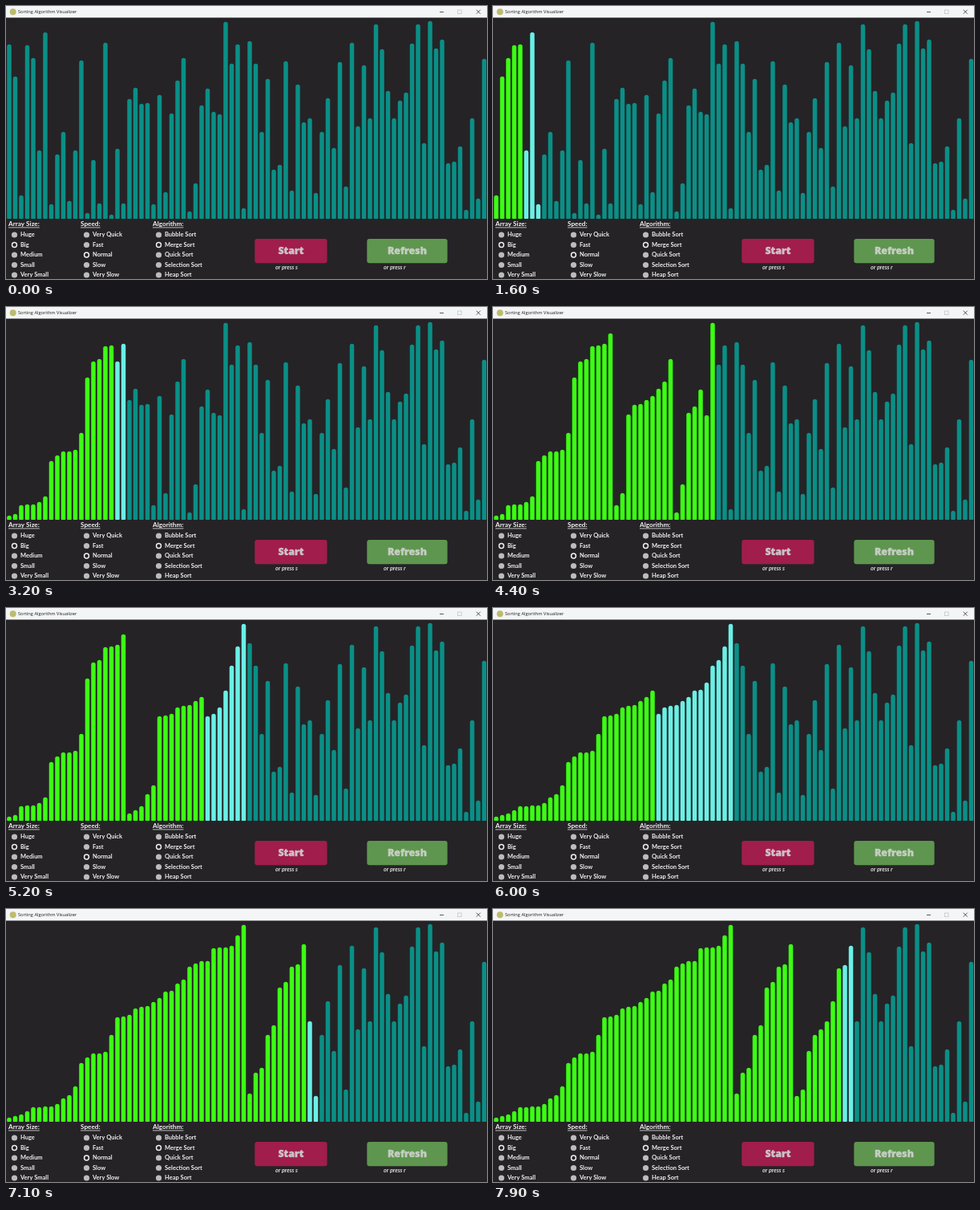
Recreate the animation shown at these times as an HTML page with a canvas. Size 600 px wide and 340 px high, loop 8 s.

```html
<!DOCTYPE html>
<html lang="en">
<head>
<meta charset="utf-8">
<title>Sorting Algorithm Visualizer</title>
<style>
  html, body { margin: 0; width: 100%; height: 100%; overflow: hidden; background: #252326; }
  canvas { display: block; width: 600px; height: 340px; }
</style>
</head>
<body>
<canvas id="stage"></canvas>
<script>
const W = 600, H = 340, LOOP = 8000, TICK = 100, BASE = 265;
const BG = '#252326', TEAL = '#0a8f86', GREEN = '#3cff14', CYAN = '#6af0e6';
const canvas = document.getElementById('stage');
const ctx = canvas.getContext('2d');
const dpr = window.devicePixelRatio || 1;
canvas.width = W * dpr;
canvas.height = H * dpr;
ctx.scale(dpr, dpr);

// Top edge of each bar before sorting
const tops = [
  48, 88, 236, 49, 65, 180, 33, 247, 185, 157, 243, 180, 68, 258, 192, 246, 46, 260, 178, 246,
  116, 102, 122, 121, 247, 111, 232, 134, 93, 65, 256, 221, 124, 103, 132, 135, 20, 72, 48, 252,
  44, 72, 157, 91, 204, 198, 69, 230, 98, 145, 140, 233, 157, 115, 177, 70, 225, 46, 150, 74,
  140, 23, 54, 106, 140, 118, 108, 47, 23, 171, 19, 53, 42, 196, 194, 175, 254, 140, 240, 66
];

// Every visible state of the merge sort; "at" is its place on the work axis
const states = [];
const START_COST = 0.25;

function record() {
  const bars = tops.slice(), tint = bars.map(() => TEAL);
  let work = 0;
  const push = cost => {
    states.push({ bars: bars.slice(), tint: tint.slice(), at: work });
    work += cost;
  };
  function sort(lo, hi) {
    if (lo >= hi) return;
    const mid = (lo + hi) >> 1;
    sort(lo, mid);
    sort(mid + 1, hi);
    const left = bars.slice(lo, mid + 1), right = bars.slice(mid + 1, hi + 1);
    tint.fill(CYAN, lo, hi + 1);
    push(START_COST);
    for (let k = lo; k <= hi; k++) {
      const takeLeft = !right.length || (left.length && left[0] >= right[0]);
      bars[k] = (takeLeft ? left : right).shift();
      tint[k] = GREEN;
      push(1);
    }
  }
  push(1);
  sort(0, bars.length - 1);
}
record();

// Pace of the sort: [tick, state reached]
const pace = [[0, 0], [12, 0], [16, 20], [32, 105], [44, 169], [60, 242], [71, 299], [79, 339]];

function stateAt(tick) {
  let i = 0;
  while (i < pace.length - 2 && tick >= pace[i + 1][0]) i++;
  const [t0, s0] = pace[i], [t1, s1] = pace[i + 1];
  const a = states[s0].at, b = states[s1].at;
  const work = a + (b - a) * (tick - t0) / (t1 - t0) + 1e-6;
  let n = s0;
  while (n < s1 && states[n + 1].at <= work) n++;
  return states[n];
}

function box(x, y, w, h, r, color) {
  ctx.fillStyle = color;
  ctx.beginPath();
  ctx.roundRect(x, y, w, h, r);
  ctx.fill();
}

function disc(x, y, r, color) {
  ctx.fillStyle = color;
  ctx.beginPath();
  ctx.arc(x, y, r, 0, Math.PI * 2);
  ctx.fill();
}

function line(color, width, ...pts) {
  ctx.strokeStyle = color;
  ctx.lineWidth = width;
  ctx.beginPath();
  for (let i = 0; i < pts.length; i += 4) {
    ctx.moveTo(pts[i], pts[i + 1]);
    ctx.lineTo(pts[i + 2], pts[i + 3]);
  }
  ctx.stroke();
}

function label(str, x, y, font, color, align = 'left') {
  ctx.font = font;
  ctx.fillStyle = color;
  ctx.textAlign = align;
  ctx.fillText(str, x, y);
}

function titleBar() {
  box(0, 0, W, 14.5, 0, '#f3f5f6');
  disc(8.7, 7.2, 4, '#bdbb6c');
  label('Sorting Algorithm Visualizer', 15, 9.4, '5.7px "Open Sans", sans-serif', '#1c1c1c');
  line('#333', 0.8, 541, 7.5, 546, 7.5);
  ctx.strokeStyle = '#c4c6c7';
  ctx.strokeRect(563.5, 5, 4.6, 4.6);
  line('#333', 0.8, 586.8, 4.7, 591.8, 9.7, 591.8, 4.7, 586.8, 9.7);
}

function group(x, title, items, chosen) {
  label(title, x, 274.3, 'bold 8.2px Lato, sans-serif', '#f2f2f2');
  line('#e4e4e4', 0.8, x, 275.9, x + ctx.measureText(title).width, 275.9);
  items.forEach((item, i) => {
    const y = 285 + 12.5 * i;
    if (i === chosen) {
      disc(x + 7.5, y, 3.7, '#f0f0f0');
      disc(x + 7.5, y, 2.2, BG);
    } else {
      disc(x + 7.5, y, 3.6, '#bcbcbc');
    }
    label(item, x + 15, y + 2.3, 'bold 7.5px Lato, sans-serif', '#f0f0f0');
  });
}

function button(x, w, str, room, hint, color, ink) {
  box(x, 290, w, 30.3, 3, color);
  const face = size => `800 condensed ${size}px "Open Sans", "Liberation Sans Narrow", sans-serif`;
  ctx.font = face(17);
  const size = Math.min(17, 17 * room / ctx.measureText(str).width);
  const mid = x + w / 2;
  label(str, mid, 305 + size * 0.36, face(size), ink, 'center');
  ctx.strokeStyle = ink;
  ctx.lineWidth = 0.4;
  ctx.strokeText(str, mid, 305 + size * 0.36);
  label(hint, x + (w > 95 ? 20.7 : 25.7), 328.4, 'italic bold 7.2px Lato, sans-serif', '#dedede');
}

function draw(now) {
  const tick = Math.floor((now % LOOP) / TICK);
  const { bars, tint } = stateAt(tick);
  box(0, 0, W, H, 0, BG);
  titleBar();
  bars.forEach((top, i) => box(1.25 + 7.5 * i, top - 0.3, 5.5, BASE - top + 0.3, [2.7, 2.7, 0.8, 0.8], tint[i]));
  group(3, 'Array Size:', ['Huge', 'Big', 'Medium', 'Small', 'Very Small'], 1);
  group(93, 'Speed:', ['Very Quick', 'Fast', 'Normal', 'Slow', 'Very Slow'], 2);
  group(183, 'Algorithm:', ['Bubble Sort', 'Merge Sort', 'Quick Sort', 'Selection Sort', 'Heap Sort'], 1);
  button(310.3, 90.3, 'Start', 32, 'or press s', '#a01d4c', '#cdc3c7');
  button(450.3, 100.3, 'Refresh', 49, 'or press r', '#5e964f', '#c6cdc3');
}

let origin = null;
function loop(now) {
  if (origin === null) origin = now;
  draw(Math.max(0, now - origin));
  requestAnimationFrame(loop);
}
draw(0);
requestAnimationFrame(loop);
</script>
</body>
</html>
```
